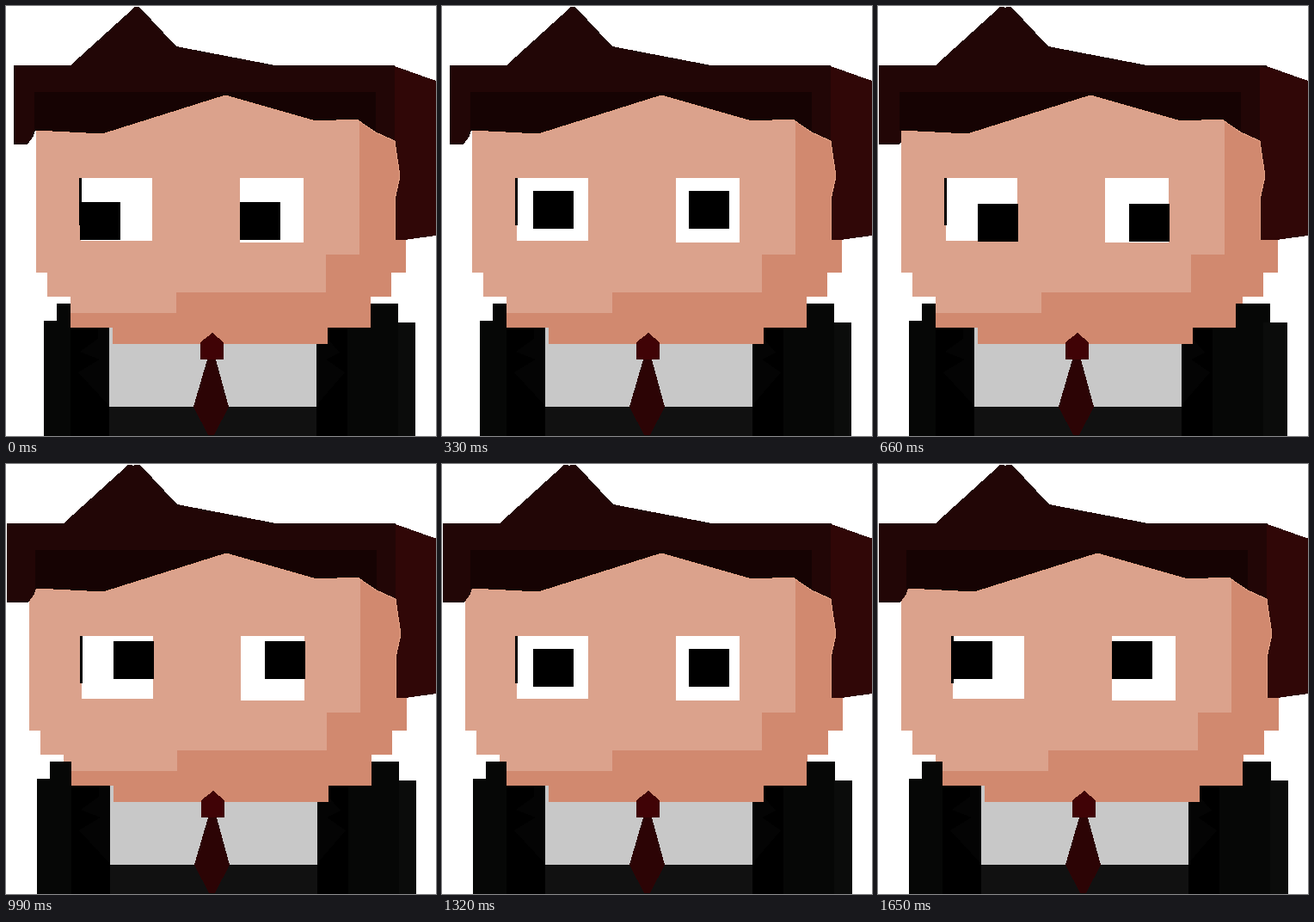
Animation of 500x500 px, one loop 1.98 s. Source, as an HTML page:

```html
<!DOCTYPE html>
<html lang="en">
<head>
<meta charset="utf-8">
<title>Looking around</title>
<style>
  html, body { margin: 0; width: 100%; height: 100%; overflow: hidden; background: #fff; }
  svg { display: block; width: 100vw; height: 100vh; shape-rendering: crispEdges; }

  .layer, .pupil { animation: 1980ms step-end infinite; }
  .second { animation-name: second; }
  .third { animation-name: third; }
  .fourth { animation-name: fourth; }
  .left { animation-name: left; }
  .right { animation-name: right; }

  /* Each shifted body stays on top of the earlier ones until the loop restarts. */
  @keyframes second { 0% { visibility: hidden } 33.333%, 100% { visibility: visible } }
  @keyframes third  { 0% { visibility: hidden } 50%, 100% { visibility: visible } }
  @keyframes fourth { 0% { visibility: hidden } 66.666%, 100% { visibility: visible } }

  @keyframes left {
    0%, 100% { transform: translate(86px, 228px) }
    16.666%  { transform: translate(106px, 215px) }
    33.333%  { transform: translate(116px, 230px) }
    50%      { transform: translate(125px, 206px) }
    66.666%  { transform: translate(106px, 215px) }
    83.333%  { transform: translate(86px, 206px) }
  }
  @keyframes right {
    0%, 100% { transform: translate(272px, 228px) }
    16.666%  { transform: translate(287px, 215px) }
    33.333%  { transform: translate(292px, 230px) }
    50%      { transform: translate(301px, 206px) }
    66.666%  { transform: translate(287px, 215px) }
    83.333%  { transform: translate(272px, 206px) }
  }
</style>
</head>
<body>
<svg viewBox="0 0 500 500">
  <defs>
    <g id="body">
      <!-- hair -->
      <path fill="#220606" d="M9 69H75L150 1H155L198 47L313 69H452V160H40V145H34L32 151L25 161H9Z"/>
      <path fill="#160303" d="M33 100H430V160H40V145H33Z"/>
      <path fill="#300707" d="M452 70L500 87V267L470 271L452 274Z"/>

      <!-- suit, shirt and tie -->
      <path fill="#c8c8c8" d="M120 374H361V466H120Z"/>
      <path fill="#111" d="M120 466H361V500H120Z"/>
      <path fill="#060706" d="M59 346H75V500H44V366H59Z"/>
      <path fill="#060706" d="M424 346H456V368H476V500H397V374H424Z"/>
      <path fill="#0b0c0b" d="M456 368H476V500H456Z"/>
      <path d="M75 374H120V500H75ZM361 374H397V500H361Z"/>
      <path fill="#040404" d="M120 374H107V387L86 402L109 411L84 426L120 465Z"/>
      <path fill="#040404" d="M361 374H373V386L388 403L372 411L394 426L361 464Z"/>

      <!-- face -->
      <path fill="#dba28c" d="M35 145L112 149L255 104L360 134L408 132L430 147L452 157L458 198L452 225V272H465V310H448V338H424V374H374V393H124V374H75V338H48V310H35Z"/>
      <path fill="#d1896f" d="M411 134L430 147L452 157L458 198L452 225V272H465V310H448V338H424V374H374V393H124V374H75V357H198V333H372V289H411Z"/>
      <path fill="none" stroke="#e2a185" d="M35 145L112 149L255 104L360 134L408 132L430 147L452 157L458 198L452 225V272"/>

      <path fill="#2c0405" d="M234 411H244L259 466L242 499H235L218 466Z"/>
      <path fill="#400306" d="M240 380L253 391V411H226V391Z"/>

      <!-- eyes -->
      <path d="M85 200H88V255H85Z"/>
      <path fill="#fff" d="M88 200H170V273H87V255H88ZM272 200H346V275H272Z"/>
    </g>
    <path id="pupil" d="M0 0H47V44H0Z"/>
  </defs>

  <use href="#body"/>
  <use href="#body" x="-8" class="layer second"/>
  <use href="#body" x="1" class="layer third"/>
  <use href="#body" class="layer fourth"/>
  <use href="#pupil" class="pupil left"/>
  <use href="#pupil" class="pupil right"/>
</svg>
</body>
</html>
```
